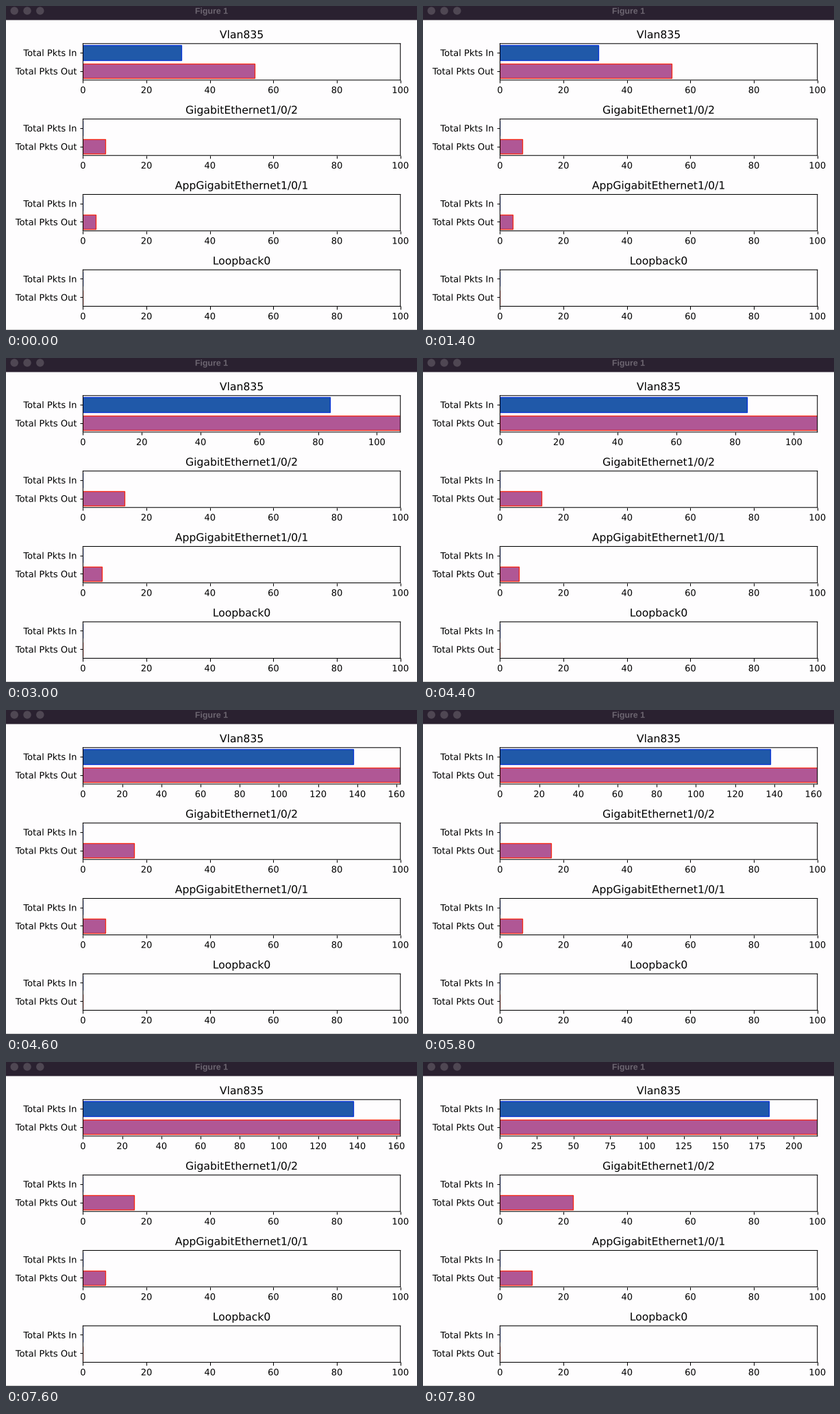
A matplotlib script that plays this animation: 600x472 px, repeating every 8000 ms.

```python
import matplotlib.pyplot as plt
from matplotlib.animation import FuncAnimation
from matplotlib.patches import Circle, Rectangle
from matplotlib.patheffects import Normal

W, H, DPI = 600, 472, 100
SCALE = 0.9375                     # window is shown slightly reduced
STEP_MS, LOOP_MS = 200, 8000

PAGE = "#fefdfe"
TITLE_BAR = "#2a2130"
BUTTON = "#4f4753"
TITLE_TEXT = "#6c6570"
FILLS = ["#2059a9", "#b05795"]
EDGES = ["#0a36d8", "#fa2a14"]

LEFT, RIGHT = 112.4, 575.7
TOP, HEIGHT, PITCH = 54.8, 53.1, 109.85

NAMES = ["Vlan835", "GigabitEthernet1/0/2", "AppGigabitEthernet1/0/1", "Loopback0"]

# Start time, then (in, out) packet counts per interface
POLLS = [
    (0, [(31, 54), (0, 7), (0, 4), (0, 0)]),
    (1600, [(84, 108), (0, 13), (0, 6), (0, 0)]),
    (4600, [(138, 162), (0, 16), (0, 7), (0, 0)]),
    (7800, [(183, 216), (0, 23), (0, 10), (0, 0)]),
]

plt.rcParams.update({
    "font.family": "DejaVu Sans",
    "font.size": 10 * SCALE,
    "axes.titlesize": 12 * SCALE,
    "axes.titlepad": 6 * SCALE,
    "axes.linewidth": 0.8 * SCALE,
    "text.hinting": "none",
    "path.effects": [Normal()],    # text as outlines, placed between pixels
    "toolbar": "None",
})

fig = plt.figure(figsize=(W / DPI, H / DPI), dpi=DPI, facecolor=PAGE)


def draw_window():
    ax = fig.add_axes([0, 0, 1, 1])
    ax.set(xlim=(0, W), ylim=(H, 0))
    ax.axis("off")
    ax.add_patch(Rectangle((0, 0), W, 20.5, fc=TITLE_BAR, lw=0, snap=False))
    ax.add_patch(Rectangle((0, 471), W, 1, fc="#c9c8c9", lw=0))
    for x in (12.2, 31, 49.8):
        ax.add_patch(Circle((x, 7), 5.7, fc=BUTTON, lw=0))
    ax.text(300, 11.3, "Figure 1", ha="center", va="baseline", color=TITLE_TEXT,
            family="Liberation Sans", weight="bold", size=8.9)


def make_panel(row, name):
    bottom = H - (TOP + row * PITCH + HEIGHT)
    ax = fig.add_axes([LEFT / W, bottom / H, (RIGHT - LEFT) / W, HEIGHT / H],
                      facecolor=PAGE)
    bars = ax.barh([1, 0], [0, 0], color=FILLS, edgecolor=EDGES, linewidth=SCALE)
    for spine in ax.spines.values():
        spine.set_snap(False)
    ax.set_ylim(-0.49, 1.49)
    ax.set_yticks([1, 0], ["Total Pkts In", "Total Pkts Out"])
    ax.tick_params(length=3.5 * SCALE, pad=3.5 * SCALE, width=0.8 * SCALE)
    ax.set_title(name)
    return ax, bars


def update(frame):
    now = frame * STEP_MS
    counts = [c for start, c in POLLS if start <= now][-1]
    for (ax, bars), pair in zip(panels, counts):
        for bar, n in zip(bars, pair):
            bar.set_width(n)
        limit = max(100, *pair)
        ax.set_xlim(0, limit)
        ax.set_xticks(range(0, limit + 1, 25 if limit > 180 else 20))
    return []


draw_window()
panels = [make_panel(i, name) for i, name in enumerate(NAMES)]

anim = FuncAnimation(fig, update, frames=LOOP_MS // STEP_MS, interval=STEP_MS,
                     init_func=lambda: update(0), repeat=True, repeat_delay=0,
                     blit=False)
plt.show()
```
